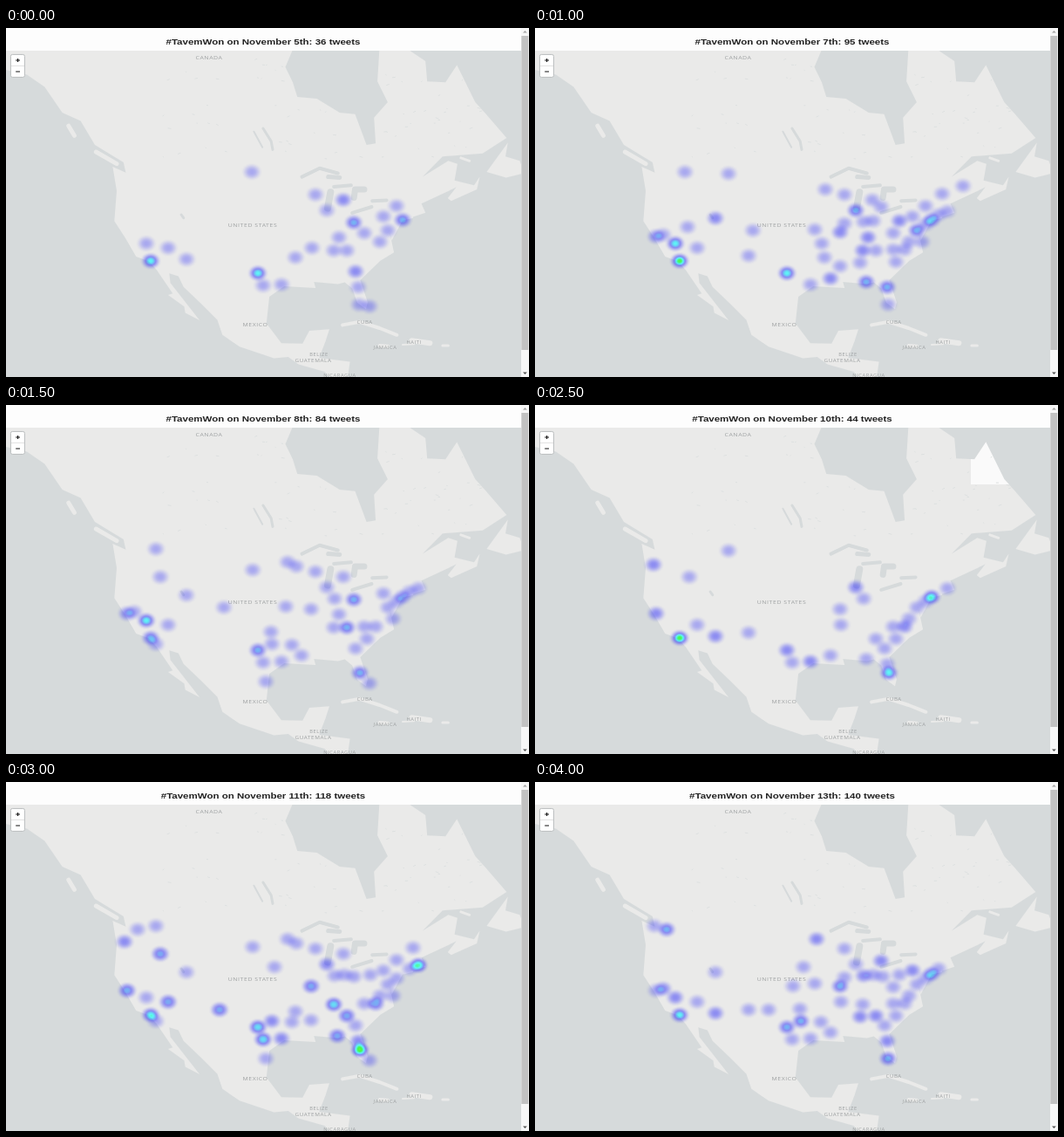
These frames come from a looping animation (600 px wide and 400 px high, 4500 ms). An HTML page with a canvas:

```html
<!DOCTYPE html>
<html lang="en">
<head>
<meta charset="utf-8">
<title>Tweet heat map</title>
<style>
  html, body { margin: 0; width: 100%; height: 100%; overflow: hidden; background: #fdfdfd; }
  svg, canvas { position: absolute; left: 0; top: 0; width: 100%; height: 100%; }
  .title { font: bold 20px "Liberation Sans", Arial, sans-serif; fill: #222; text-anchor: middle; }
  .label { font-family: "Open Sans", sans-serif; fill: #9da0a1; letter-spacing: 1px; text-anchor: middle; }
  .ribbon { fill: none; stroke-linecap: round; stroke-linejoin: round; }
</style>
</head>
<body>
<svg viewBox="0 0 600 400" preserveAspectRatio="none">
  <defs>
    <clipPath id="map"><rect y="26" width="591" height="374"/></clipPath>
    <clipPath id="tile"><rect x="500" y="26" width="91" height="65"/></clipPath>
    <clipPath id="shore"><path class="coast"/></clipPath>
  </defs>
  <rect width="600" height="400" fill="#fdfdfd"/>
  <g clip-path="url(#map)">
    <rect y="26" width="591" height="374" fill="#d6dadb"/>
    <path class="coast" fill="#eaeae9"/>
    <path class="coast" id="stale" fill="#fafafa" clip-path="url(#tile)"/>
    <path id="ponds" clip-path="url(#shore)" fill="none" stroke="#dde0e0"/>
    <g id="ribbons"></g>
    <g id="labels"></g>
  </g>
  <text id="title" class="title" transform="translate(295 18.8) scale(.577 .49)"></text>
  <g>
    <rect x="5.4" y="30.4" width="16" height="26" rx="2" fill="#fff" stroke="#b9bcbd"/>
    <path d="M6 43.4H21" stroke="#ccc" stroke-width=".6"/>
    <path d="M11.2 37H16M13.6 35V39M11.2 50H16" stroke="#111" stroke-width="1.1"/>
  </g>
  <g>
    <rect x="591" width="9" height="400" fill="#f7f7f7"/>
    <rect x="591.3" y="9" width="8" height="360" fill="#c2c2c2"/>
    <path d="M593 5.5L595.4 3L597.8 5.5Z" fill="#a3a3a3"/>
    <path d="M593 394.5L595.4 397L597.8 394.5Z" fill="#505050"/>
  </g>
</svg>
<canvas id="heat" width="600" height="400"></canvas>
<script>
const $ = id => document.getElementById(id);

// Mercator projection, longitude and latitude in degrees
const merc = lat => Math.log(Math.tan(Math.PI / 4 + lat * Math.PI / 360)) * 180 / Math.PI;
const project = ([lon, lat]) =>
  [165 + (lon + 118.2) * 6.56, 266 - (merc(lat) - 36.19) * 5.55].map(v => v.toFixed(1));
const line = s => 'M' + s.trim().split(/\s+/).map(p => project(p.split(',').map(Number))).join('L');

// Capes and bays, counter-clockwise from Alaska
const pacific = `-144,60.1 -139.7,59.5 -136.6,58.2 -133.5,55.3 -130.3,54.3 -127.8,51.3 -122.8,49 -122.4,47.6
  -124.7,48.4 -124,45 -124.4,40.4 -122.5,37.7 -120.6,34.6 -118.4,33.8 -117,32.3 -114.2,28.1 -115,27.8
  -112.2,25.7 -112,24.5 -109.5,23.1 -114.6,30 -114.8,31.7 -113.2,31.2 -112.3,29.3 -109.3,26.3 -106.4,23.2
  -105.5,20.3 -102.5,18 -96.5,15.7 -94,16 -92.2,14.5 -87.6,13 -86,11 `;
const gulf = `-83.7,11 -83.2,15 -88.6,15.8 -87.5,19 -86.8,21.4 -90.3,21.1 -91.5,18.6 -95.2,18.7 -97.8,22.5
  -97.3,27.5 -94.7,29.4 -89.2,29.1 -89.5,30.2 -85.3,29.8 -84.1,30.1 -82.8,29 -81.9,26.4 -80.4,25.2 `;
const atlantic = `-80.1,26.5 -81.4,30.5 -77.9,33.9 -75.5,35.3 -76.4,39.2 -75.9,37.3 -74,40.5 -70,41.7 -70.7,43.1
  -64.6,45.5 -66.1,43.9 -65.5,43.5 -61,45.2 -60.5,47 -61.5,45.8 -64.9,46.5 -64.4,48.8 -66,49.2 -70.5,47
  -67,49.8 -60,50.2 -55.8,52.2 -59.5,55.2 -61.3,56.5 -64.5,60.5 -66.5,58.7 -69.7,58.8 -70,60.9 -74,62.4
  -78,62.5 -78.4,58.8 -76.6,56.5 -79,54.7 -78.7,51.5 -80.3,51.3 -82.3,55.1 -85,55.3 -89,56.9 -92.4,57.1
  -93.2,58.7 -94.5,60.3 -93,62.3 -144,62.5`;
const newfoundland = '-59.3,47.7 -55.6,51.6 -56,49.8 -53.5,49.2 -52.7,47.5 -55.9,46.9';
const coast = line(pacific + gulf + atlantic) + 'Z' + line(newfoundland) + 'Z';
document.querySelectorAll('.coast').forEach(p => p.setAttribute('d', coast));

// Narrow islands and lakes as thick lines
const ribbons = (colour, items) => items.map(([width, s]) =>
  `<path class="ribbon" stroke="${colour}" stroke-width="${width}" d="${line(s)}"/>`).join('');
$('ribbons').innerHTML = ribbons('#eaeae9', [
  [5, '-127.6,50.4 -124,48.8'], [5, '-132.4,53.7 -131.4,52.5'], [3, '-63.8,49.6 -62.3,49.2'],
  [2, '-73.8,40.7 -72.3,41'], [4, '-84.5,22.2 -81.5,22.8 -78,21.6 -75,20.3'], [4, '-78,18.2 -76.6,18.1'],
  [6, '-72.4,19.2 -69.2,18.7'], [2, '-74,18.4 -72,18.5'], [3, '-67,18.2 -66,18.2']
]) + ribbons('#d6dadb', [
  [4, '-91.6,47 -88.5,48.2 -85.3,47.5'], [5, '-87,47 -85,46.9'], [8, '-87.1,42.4 -86.6,44.8'], [4, '-86,45.6 -83,45.8'],
  [7, '-82.5,44 -82.3,45.2 -80.7,45.2'], [4, '-82.8,41.7 -79.4,42.6'], [4, '-79.3,43.5 -76.8,43.6'],
  [3, '-96.7,50.7 -97,51.8 -98.4,53.4'], [2, '-98.5,51 -100,53'], [3, '-112.7,41.4 -112.3,40.9']
]);

// Scattered small northern lakes
let seed = 11;
const rnd = () => (seed = seed * 16807 % 2147483647) / 2147483647;
let ponds = '';
for (let i = 0; i < 90; i++) {
  const at = project([-116 + 56 * rnd(), 49.5 + 12 * rnd()]);
  ponds += `M${at}l${1 + 3 * rnd()} ${3 * rnd() - 1.5}`;
}
$('ponds').setAttribute('d', ponds);

$('labels').innerHTML = [
  ['CANADA', 233, 36.4, 12], ['UNITED STATES', 283, 228.4, 12], ['MEXICO', 286, 342.4, 12],
  ['CUBA', 411.7, 339.4, 10.5], ['JAMAICA', 435, 367.6, 10], ['HAITI', 468, 361.8, 10],
  ['BELIZE', 359, 375.8, 10], ['GUATEMALA', 352.5, 382.8, 11], ['NICARAGUA', 383, 400.4, 10]
].map(([name, x, y, size]) =>
  `<text class="label" font-size="${size}" transform="translate(${x} ${y}) scale(.577 .49)">${name}</text>`).join('');

// Places that tweets come from, in stage pixels
const places = {};
for (const [, name, x, y] of `
  sea 137,165 yak 151,169 pdx 136,183 spo 172,165 mt 222,167 boi 177,197 nd 282,165 sd 283,189 wy 226,189
  slc 207,218 den 250,232 nv 186,252 reno 175,228 sf 139,239 sac 147,237 fre 161,247 la 166,267 san 172,274
  phx 207,265 abq 245,261 ama 268,261 tx 289,281 dal 305,274 sat 295,295 hou 316,294 rgv 298,317 okc 304,260
  tul 328,275 kan 296,234 oma 308,212 kc 321,231 msp 323,180 dul 333,185 stl 350,234 spr 329,247 ark 332,263
  nola 339,287 ms 350,273 mem 351,252 gb 355,191 chi 368,209 mi 387,197 det 397,205 ind 377,222 peo 355,224
  cin 388,221 clb 399,223 cle 418,221 ky 382,240 nsh 376,255 knx 391,255 atl 391,268 bhm 373,269 mob 380,291
  jax 404,297 tpa 406,307 ftm 405,317 mia 417,319 clt 411,254 ral 424,254 col 414,268 sav 401,279 ric 429,245
  dc 438,232 wv 411,235 pit 433,216 nyc 455,220 alb 448,204 bos 473,210 vt 467,190 me 491,181 con 463,214
  phi 448,225 nor 444,245`.matchAll(/(\w+) (\d+),(\d+)/g)) places[name] = [+x, +y];

// A digit after a place is its peak heat in tenths
const spots = s => s.trim().split(/\s+/).map(p => {
  const [, name, tenths = 2.8] = p.match(/([a-z]+)(\d?)/).map(v => v || undefined);
  return [...places[name], tenths / 10];
});
const blend = (a, b) => [...a, ...b].filter((_, i) => i % 2 === 0);

const nov5 = spots(`nd gb chi mi4 clb5 alb pit nyc5 dc wv ric fre nv phx la6 tx6 sat hou ark mem nsh knx ky
  sav4 jax ftm mia`);
const nov7 = spots(`spo mt dul gb mi det chi5 ind cin peo stl4 kc spr sf4 reno slc4 den fre6 sac nv abq la7 tx6
  ms hou ark nola4 bhm nsh4 knx ky4 mob5 jax5 ftm col clt ral ric nor dc5 wv cle4 pit alb phi nyc5 con bos vt me`);
const nov8 = spots(`spo boi slc den msp dul sd gb mi chi clb5 pit nyc4 con phi bos dc nor stl kc ind ky knx5 nsh
  clt ral col sav sf4 sac fre6 nv la5 san okc dal tul tx5 sat hou nola rgv tpa5 mia`);
const nov10 = spots(`pdx4 mt boi sf4 nv phx4 abq la7 stl mem chi4 ind bos nyc6 phi dc ric ral4 clt col atl sav
  tx4 sat hou4 nola mob jax tpa6`);
const nov12 = spots(Object.keys(places).join(' ') + ` spo sf3 sac3 la6 den3 dal4 tx4 sat4 hou3 dul nyc4 bos5
  tpa3 jax4 cle3 clb3 ind3 nsh4 clt ral`);
const nov13 = spots(`sea yak5 msp4 gb chi det4 ind4 cin peo clb cle pit4 nyc5 con phi dc ric ral clt col wv
  stl5 mem kc oma kan slc sf sac4 fre4 nv abq ama phx4 la6 okc dal5 tx5 tul hou sat nola nsh bhm4 atl4 sav
  jax4 ftm5`);

const days = [
  [36, nov5], [64, blend(nov5, nov7)], [95, nov7], [84, nov8], [61, blend(nov8, nov10)],
  [44, nov10], [118, blend(nov10, nov12)], [393, nov12], [140, nov13]
];
const STEP = 500, FIRST = 5, STALE = 5, R = 12.5;

const ctx = $('heat').getContext('2d', { willReadFrequently: true });
const glow = ctx.createRadialGradient(0, 0, 0, 0, 0, R);
for (let r = 0; r <= 1; r += .125) {
  glow.addColorStop(r, `rgba(0,0,0,${(1 + Math.cos(Math.PI * r ** 1.2)) / 2})`);
}

// Colour ramp, indexed by accumulated alpha
const ramp = (() => {
  const c = Object.assign(document.createElement('canvas'), { width: 256, height: 1 }).getContext('2d');
  const g = c.createLinearGradient(0, 0, 256, 0);
  [[.4, 'blue'], [.6, 'cyan'], [.7, 'lime'], [.8, 'yellow'], [1, 'red']].forEach(s => g.addColorStop(...s));
  c.fillStyle = g;
  c.fillRect(0, 0, 256, 1);
  return c.getImageData(0, 0, 256, 1).data;
})();

function drawHeat(points) {
  ctx.resetTransform();
  ctx.clearRect(0, 0, 600, 400);
  ctx.fillStyle = glow;
  for (const [x, y, heat] of points) {
    ctx.setTransform(1, 0, 0, .85, x, y);
    ctx.globalAlpha = heat;
    ctx.fillRect(-R, -R, 2 * R, 2 * R);
  }
  const img = ctx.getImageData(0, 0, 600, 400), px = img.data;
  for (let i = 0; i < px.length; i += 4) {
    const k = px[i + 3] * 4;
    if (k) for (let c = 0; c < 3; c++) px[i + c] = ramp[k + c];
  }
  ctx.putImageData(img, 0, 0);
}

let shown = -1;
function render(ms) {
  const day = Math.floor(ms / STEP) % days.length;
  if (day === shown) return;
  const [count, points] = days[shown = day];
  $('title').textContent = `#TavemWon on November ${FIRST + day}th: ${count} tweets`;
  $('stale').style.display = day === STALE ? '' : 'none';
  drawHeat(points);
}

const start = performance.now();
function loop() {
  render(performance.now() - start);
  requestAnimationFrame(loop);
}
loop();
</script>
</body>
</html>
```
